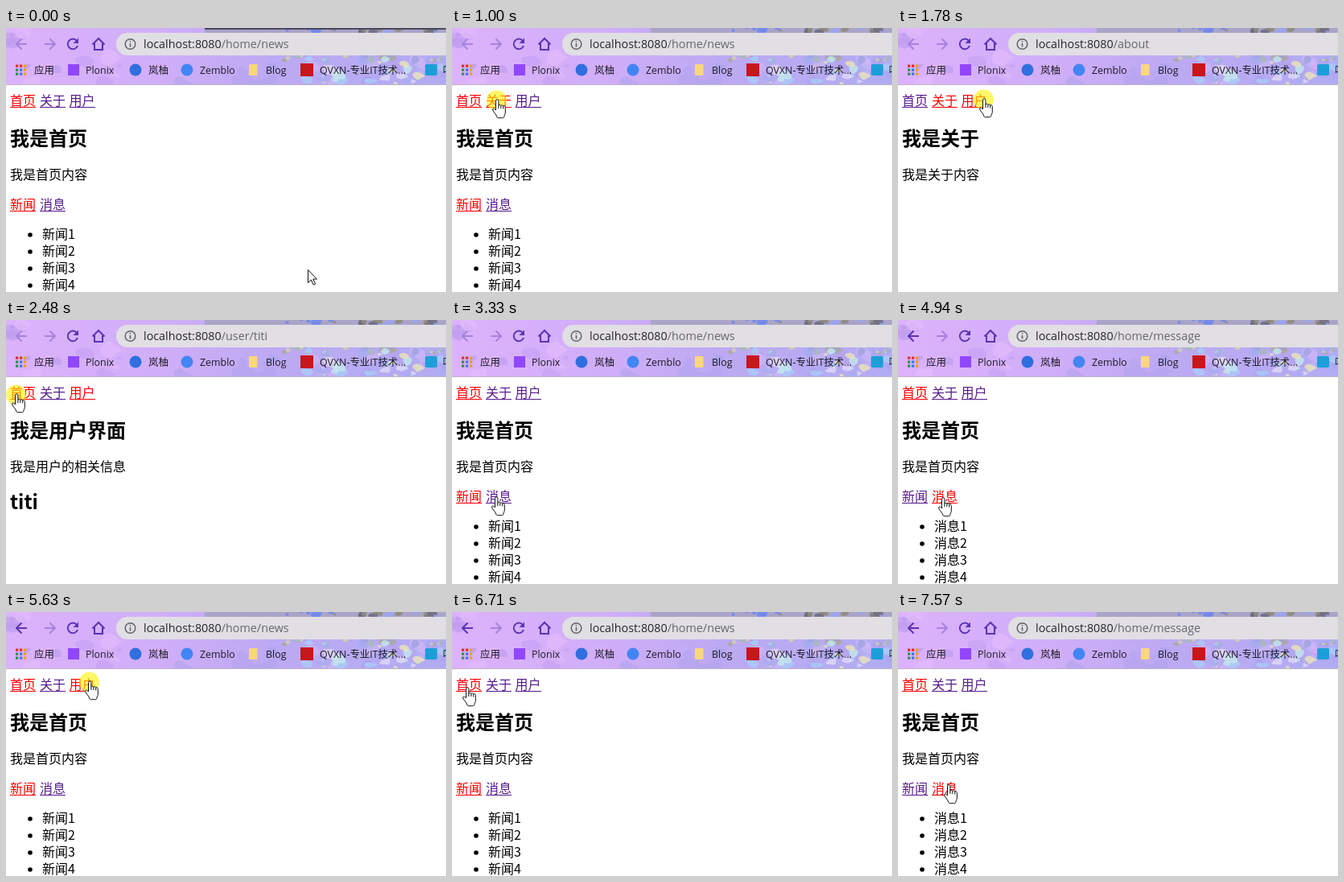
Recreate the animation shown at these times as an HTML page. Size 547x328 px, loop 9510 ms.

```html
<!DOCTYPE html>
<html lang="zh">
<head>
<meta charset="utf-8">
<title>Router demo</title>
<style>
  html, body { margin: 0; width: 100%; height: 100%; overflow: hidden; background: #fff; }
  svg { display: block; width: 547px; height: 328px; }
  text { font-family: "Open Sans", "Noto Sans CJK SC", "Noto Sans CJK", sans-serif; white-space: pre; }
  .page text { font-family: "Noto Sans CJK SC", "Noto Sans CJK", "Open Sans", sans-serif; font-size: 16px; }
  .page .title { font-size: 24px; font-weight: bold; }
  .url { font-size: 14.35px; fill: #25252a; }
  .marks text { font-size: 12.4px; fill: #1d1a24; }
  .icon { fill: none; stroke: #5a34b4; stroke-width: 2; }
</style>
</head>
<body>
<svg id="stage" viewBox="0 0 547 328"></svg>
<script>
const LOOP = 9510, TICK = 77.1;
const RED = '#ff0000', VISITED = '#551a8b', INK = '#5a34b4', FADED = '#a583dc';
const stage = document.getElementById('stage');

const LINKS = [
  { label: '首页', x: 5, y: 96, on: ['news', 'message'] },
  { label: '关于', x: 42, y: 96, on: ['about'] },
  { label: '用户', x: 78.5, y: 96, on: ['user'] },
  { label: '新闻', x: 5, y: 225, on: ['news'], nested: true },
  { label: '消息', x: 42, y: 225, on: ['message'], nested: true }
];
const PAGES = {
  news: { path: '/home/news', title: '我是首页', body: '我是首页内容', item: '新闻' },
  message: { path: '/home/message', title: '我是首页', body: '我是首页内容', item: '消息' },
  about: { path: '/about', title: '我是关于', body: '我是关于内容' },
  user: { path: '/user/titi', title: '我是用户界面', body: '我是用户的相关信息', extra: 'titi' }
};
// press time, release time, page shown on release
const CLICKS = [
  [920, 1170, 'about'], [1780, 1930, 'user'], [2480, 2560, 'news'],
  [3710, 3790, 'message'], [4330, 4400, 'news'], [4870, 4940, 'message'],
  [5170, 5250, 'news'], [5630, 5710, 'user'], [6630, 6710, 'news'], [7420, 7490, 'message']
];
// pointer hotspot: time, x, y
const MOVES = [
  [0, 375, 300], [225, 69, 106], [310, 69, 106], [535, 56, 90], [610, 56, 90], [685, 56, 89],
  [1080, 56, 89], [1310, 80, 94], [1390, 80, 94], [1770, 107, 88], [2010, 107, 88],
  [2460, 13, 92], [2785, 13, 92], [3310, 55, 220], [3390, 55, 220], [3465, 54, 223],
  [3850, 54, 223], [4240, 24, 221], [4460, 24, 221], [4780, 56, 221], [4930, 56, 221],
  [5160, 24, 221], [5230, 24, 221], [5550, 104, 86], [5770, 104, 86], [6400, 19, 94],
  [6780, 19, 94], [7390, 63, 215]
];

function random(seed) {
  return () => (seed = (seed * 16807) % 2147483647) / 2147483647;
}

function splashes(seed, count, [x, y, w, h], size, colors, opacity) {
  const rnd = random(seed);
  let out = '';
  for (let i = 0; i < count; i++) {
    const cx = x + rnd() * w, cy = y + rnd() * h, r = size * (0.4 + rnd());
    const pts = [];
    for (let a = 0; a < 7; a++) {
      const d = r * (0.4 + rnd() * 0.8), th = a * Math.PI * 2 / 7;
      pts.push([cx + 1.4 * d * Math.cos(th), cy + d * Math.sin(th)]);
    }
    const mid = (p, q) => `${((p[0] + q[0]) / 2).toFixed(1)} ${((p[1] + q[1]) / 2).toFixed(1)}`;
    const path = pts.map((p, k) => `Q${p[0].toFixed(1)} ${p[1].toFixed(1)} ${mid(p, pts[(k + 1) % 7])}`).join('');
    out += `<path d="M${mid(pts[6], pts[0])}${path}Z" fill="${colors[i % colors.length]}" opacity="${opacity}"/>`;
  }
  return out;
}

function appsIcon() {
  const colors = ['#d93025', '#d93025', '#e8a200', '#2b9348', '#3b78e7', '#e8a200', '#2b9348', '#3b78e7', '#e8a200'];
  return colors.map((c, i) =>
    `<rect x="${12 + i % 3 * 5}" y="${45.5 + Math.floor(i / 3) * 5}" width="3.2" height="3.2" fill="${c}"/>`).join('');
}

const label = (x, text) => `<text x="${x}" y="56.5">${text}</text>`;

function toolbar() {
  return `
  <defs>
    <linearGradient id="sky"><stop offset="0" stop-color="#dcb2fc"/><stop offset=".35" stop-color="#d0aef8"/>
      <stop offset=".6" stop-color="#bda9f3"/><stop offset="1" stop-color="#b1acf2"/></linearGradient>
    <clipPath id="bar"><rect width="547" height="70"/></clipPath>
  </defs>
  <g clip-path="url(#bar)">
    <rect width="547" height="70" fill="url(#sky)"/>
    ${splashes(17, 16, [0, 0, 260, 70], 10, ['#c8a2f3', '#e3bafc', '#bd9cee'], 0.7)}
    ${splashes(91, 20, [220, 38, 330, 32], 9, ['#b5a4ee', '#cdb6f6', '#a9a4ee'], 0.7)}
    ${splashes(43, 22, [345, 33, 205, 10], 4, ['#a9a892', '#9aa2dc', '#d6d4a6', '#a6b9b8'], 0.75)}
    ${splashes(29, 28, [375, 38, 172, 32], 6, ['#a9cdf8', '#c4ecec', '#eee9b4', '#a5acf2', '#e4dcf8'], 0.75)}
    <rect x="247" width="300" height="6" fill="#a9a4c8"/>
    ${splashes(57, 22, [350, 0, 200, 6], 5, ['#6e86ee', '#8e8b78', '#9aa6f4', '#6d6a7c'], 0.85)}
    <rect id="idle" x="247" width="300" height="2" fill="#4b4860"/>
  </g>
  <path d="M0 70.5H547" stroke="#c0b6ca"/>
  <rect x="137" y="6" width="440" height="28" rx="14" fill="#e1dfe3"/>
  <path id="back" class="icon" d="M26 20H13.5M19.5 13.5L13 20L19.5 26.5"/>
  <path class="icon" style="stroke:${FADED}" d="M48 20H60.5M54.5 13.5L61 20L54.5 26.5"/>
  <path class="icon" d="M88 16A6.3 6.3 0 1 0 89 22"/><path d="M90 12.5V19H83.5Z" fill="${INK}"/>
  <path class="icon" d="M107.5 20.5L115 13L122.5 20.5M110 19V27H120V19"/>
  <circle cx="154.5" cy="20" r="6.3" fill="none" stroke="#5f6368" stroke-width="1.5"/>
  <path d="M154.5 19V23.5M154.5 16V17.6" stroke="#5f6368" stroke-width="1.6"/>
  <text class="url" x="171" y="25">localhost:8080<tspan id="path" fill="#66666d"></tspan></text>
  <g class="marks">
    ${appsIcon()}${label(35, '应用')}
    <rect x="77" y="45" width="14" height="14" fill="#9146ff"/>${label(99, 'Plonix')}
    <circle cx="161" cy="52" r="7.5" fill="#2f6fe0"/>${label(177, '岚柚')}
    <circle cx="225" cy="52" r="7.5" fill="#4285f4"/>${label(241, 'Zemblo')}
    <rect x="302" y="45" width="10.5" height="14" rx="1" fill="#fbd77c"/>${label(323, 'Blog')}
    <rect x="366" y="44" width="16" height="16" fill="#c8161d"/>${label(390, 'QVXN-专业IT技术...')}
    <rect x="521" y="45" width="15" height="14" rx="2" fill="#1c9fd8"/>${label(543, '叶')}
  </g>`;
}

function pageArea() {
  const links = LINKS.map(l => `<g class="link"><text x="${l.x}" y="${l.y}">${l.label}</text>
    <rect x="${Math.round(l.x)}" y="${l.y + 2}" width="32" height="1"/></g>`).join('');
  const rows = [1, 2, 3, 4].map(n => `<circle cx="30" cy="${236 + n * 21}" r="2.8"/>
    <text class="row" x="45" y="${241 + n * 21}"></text>`).join('');
  return `<g class="page">
    ${links}
    <text id="title" class="title" x="5" y="146"></text>
    <text id="body" x="5" y="188"></text>
    <text id="extra" class="title" x="5" y="235"></text>
    <g id="list">${rows}</g>
  </g>`;
}

stage.innerHTML = toolbar() + pageArea() + `
  <circle id="glow" r="12.5" fill="#fff200" opacity=".6"/>
  <g id="pointer" fill="#fff" stroke="#111" stroke-linejoin="round">
    <path id="arrow" d="M.5 .5V16.5L4.3 13L7.2 19L9.6 18L6.8 12H11.5Z"/>
    <g id="hand" transform="translate(-6.5 -1)">
      <path d="M5 14V2.5a1.7 1.700 0 0 1 3.400 0V8.500c0-1.600 2.900-1.600 2.900 .300c0-1.500 2.900-1.300 2.900 .700c0-1.300 2.600-1.100 2.600 1V17c0 2.500-1.500 3.500-1.500 5c0 1.200-.8 1.700-2 1.700H8.200c-1.200 0-1.700-.7-2-1.700c-.8-3-3.800-5-5-8C.4 11.700 3.200 11.300 5 14Z"/>
      <path d="M8.400 8.500V12M11.300 9V12M14.200 9.500V12.500" fill="none"/>
    </g>
  </g>`;

const $ = id => document.getElementById(id);
const linkNodes = [...stage.querySelectorAll('.link')];
const rowNodes = [...stage.querySelectorAll('.row')];
const show = (node, on) => node.setAttribute('display', on ? 'inline' : 'none');

function pointerAt(time) {
  const t = Math.floor((time + 12) / TICK) * TICK;
  const i = MOVES.findIndex(m => m[0] > t);
  if (i < 0) return MOVES[MOVES.length - 1].slice(1);
  const [t0, x0, y0] = MOVES[i - 1], [t1, x1, y1] = MOVES[i];
  const u = (t - t0) / (t1 - t0), k = u * u * (3 - 2 * u);
  return [Math.round(x0 + (x1 - x0) * k), Math.round(y0 + (y1 - y0) * k)];
}

function render(t) {
  const name = CLICKS.reduce((page, c) => t >= c[1] ? c[2] : page, 'news');
  const pressed = CLICKS.some(c => t >= c[0] && t < c[1]);
  const page = PAGES[name];
  const [x, y] = pointerAt(t);
  const over = LINKS.findIndex(l => (page.item || !l.nested) &&
    x >= l.x && x <= l.x + 32 && y >= l.y - 16 && y <= l.y + 5);

  LINKS.forEach((l, i) => {
    const red = l.on.includes(name) || (pressed && i === over);
    linkNodes[i].setAttribute('fill', red ? RED : VISITED);
    show(linkNodes[i], page.item || !l.nested);
  });
  $('path').textContent = page.path;
  $('title').textContent = page.title;
  $('body').textContent = page.body;
  $('extra').textContent = page.extra || '';
  rowNodes.forEach((row, i) => { row.textContent = page.item ? page.item + (i + 1) : ''; });
  show($('list'), page.item);

  show($('idle'), t < 920);
  $('back').style.stroke = t >= 3790 ? INK : FADED;

  $('pointer').setAttribute('transform', `translate(${x} ${y})`);
  show($('hand'), over >= 0);
  show($('arrow'), over < 0);
  $('glow').setAttribute('cx', x - 0.5);
  $('glow').setAttribute('cy', y + 1);
  show($('glow'), pressed);
}

const start = performance.now();
function frame() {
  render((performance.now() - start) % LOOP);
  requestAnimationFrame(frame);
}
frame();
</script>
</body>
</html>
```
